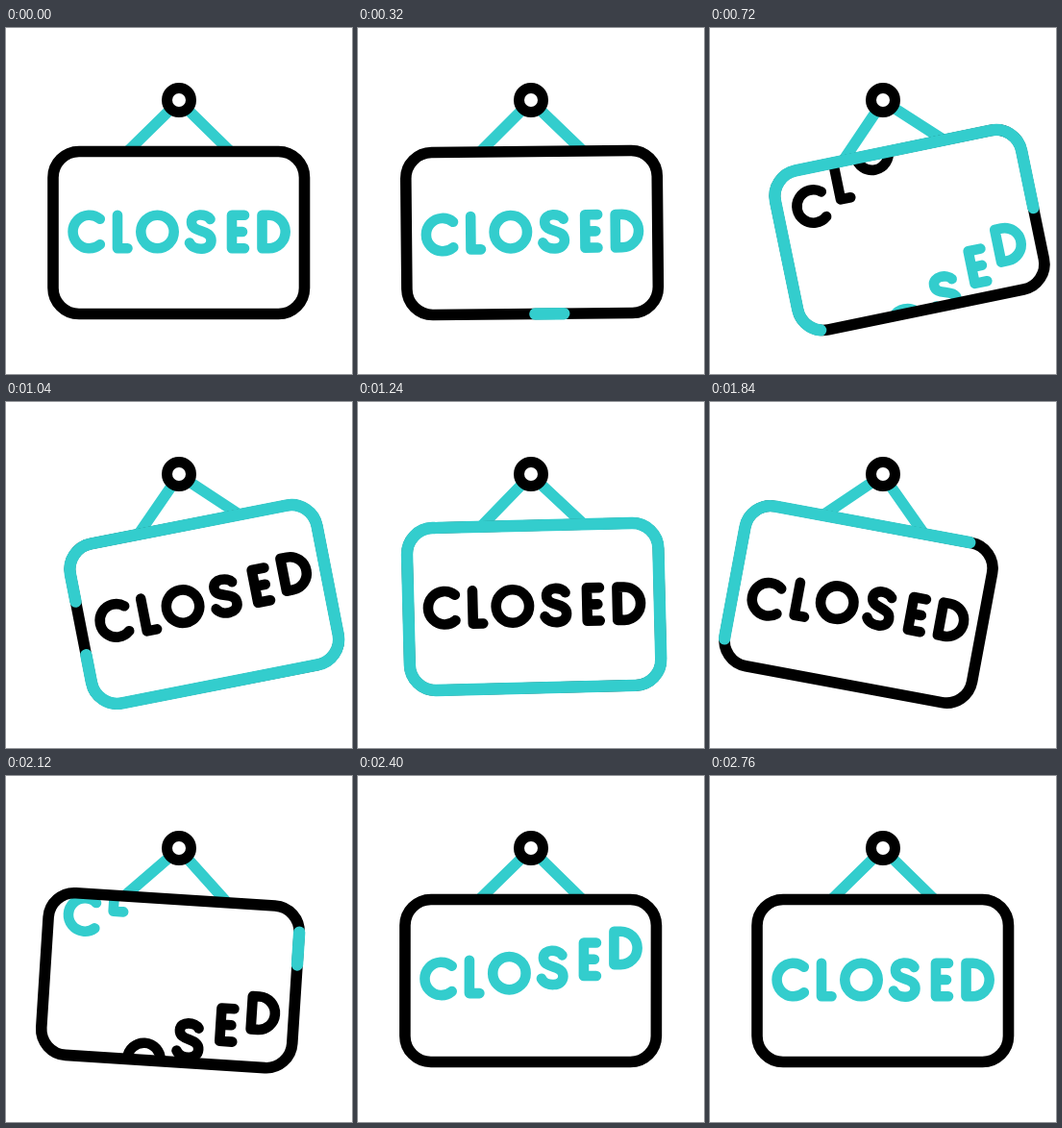
Animation, 360 px wide and 360 px high, one loop 3 s. Source, as an HTML page:

```html
<!DOCTYPE html>
<html lang="en">
<head>
<meta charset="utf-8">
<title>Swinging closed sign</title>
<style>
  html, body { margin: 0; height: 100%; overflow: hidden; background: #fff; }
  svg { display: block; width: 100vw; height: 100vh; }
  .line { fill: none; stroke-linecap: round; stroke-linejoin: round; }
  .teal { stroke: #33cdcd; }
  .black { stroke: #000; }
</style>
</head>
<body>
<svg viewBox="0 0 360 360" role="img" aria-label="CLOSED">
  <defs>
    <clipPath id="board"><rect x="49" y="128.5" width="261.5" height="169" rx="27"/></clipPath>
  </defs>
  <g id="sign">
    <path class="line teal" stroke-width="11.5" d="M128 127L180 76L232 127"/>
    <rect x="49" y="128.5" width="261.5" height="169" rx="27" fill="#fff"/>
    <g clip-path="url(#board)" stroke-width="10.6">
      <g id="teal" class="line teal"></g>
      <g id="black" class="line black"></g>
    </g>
    <g class="line">
      <rect class="black" stroke-width="11.6" x="49" y="128.5" width="261.5" height="169" rx="27"/>
      <rect id="trim" class="teal" stroke-width="12.4" x="49" y="128.5" width="261.5" height="169" rx="27"/>
    </g>
  </g>
  <circle cx="180" cy="75" r="12.5" fill="#fff" stroke="#000" stroke-width="11"/>
</svg>
<script>
const LOOP = 3000;
const DROP = 179;
const EDGE = 2 * (207.5 + 115) + 2 * Math.PI * 27;
const GLYPHS = [
  'M97.8 198.8A17.2 17.2 0 1 0 97.8 225.2',
  'M116 194.8V229.2H126.5',
  'M140.3 212a17.2 17.2 0 1 0 34.4 0a17.2 17.2 0 1 0 -34.4 0Z',
  'M212.5 199C209 193 193 192 193 202C193 214 213.5 208.5 213.5 221C213.5 232.5 195 232 191 223.5',
  'M248 194.8H235V229.2H248M235 212H246',
  'M266.5 194.8H273.5a17.2 17.2 0 0 1 0 34.4H266.5Z',
];

const byId = id => document.getElementById(id);
const clamp = v => Math.min(1, Math.max(0, v));
const ease = u => u < 0.5 ? 4 * u ** 3 : 1 - 4 * (1 - u) ** 3;
const tween = (t, from, to) => ease(clamp((t - from) / (to - from)));

const addLetters = id => {
  byId(id).innerHTML = GLYPHS.map(d => `<path d="${d}"/>`).join('');
  return [...byId(id).children];
};
const tealLetters = addLetters('teal');
const blackLetters = addLetters('black');
const shift = (el, drops) => el.setAttribute('transform', `translate(0 ${drops * DROP})`);

function swing(t) {
  const angle = 12.2 * (tween(t, 860, 1540) - tween(t, 160, 880))
    + 11 * (tween(t, 900, 1760) - tween(t, 1660, 2478));
  byId('sign').setAttribute('transform', `rotate(${angle} 180 75)`);
}

function dropLetters(t) {
  GLYPHS.forEach((_, i) => {
    const fall = start => tween(t, start + 42 * i, start + 42 * i + 855);
    const tealIn = fall(1643);
    shift(tealLetters[i], tealIn > 0 ? tealIn - 1 : fall(196));
    shift(blackLetters[i], fall(202) - 1 + fall(1617));
  });
}

// The teal stroke grows around the frame, then its tail catches up, while the whole run drifts clockwise.
function runEdge(t) {
  const grow = 1 - clamp((1192 - t) / 893) ** 1.5;
  const shrink = clamp((t - 1217) / 930) ** 1.5;
  const length = (grow - shrink) * EDGE;
  const u = (t - 320) / 1800;
  const tail = 478 + 619 * u + 175 * u * u * (1 - u) + shrink * EDGE;
  const trim = byId('trim');
  trim.style.display = length > 0 ? '' : 'none';
  trim.setAttribute('stroke-dasharray', `${length} ${EDGE - length}`);
  trim.setAttribute('stroke-dashoffset', -tail % EDGE);
}

function draw() {
  const t = performance.now() % LOOP;
  swing(t);
  dropLetters(t);
  runEdge(t);
  requestAnimationFrame(draw);
}
draw();
</script>
</body>
</html>
```
